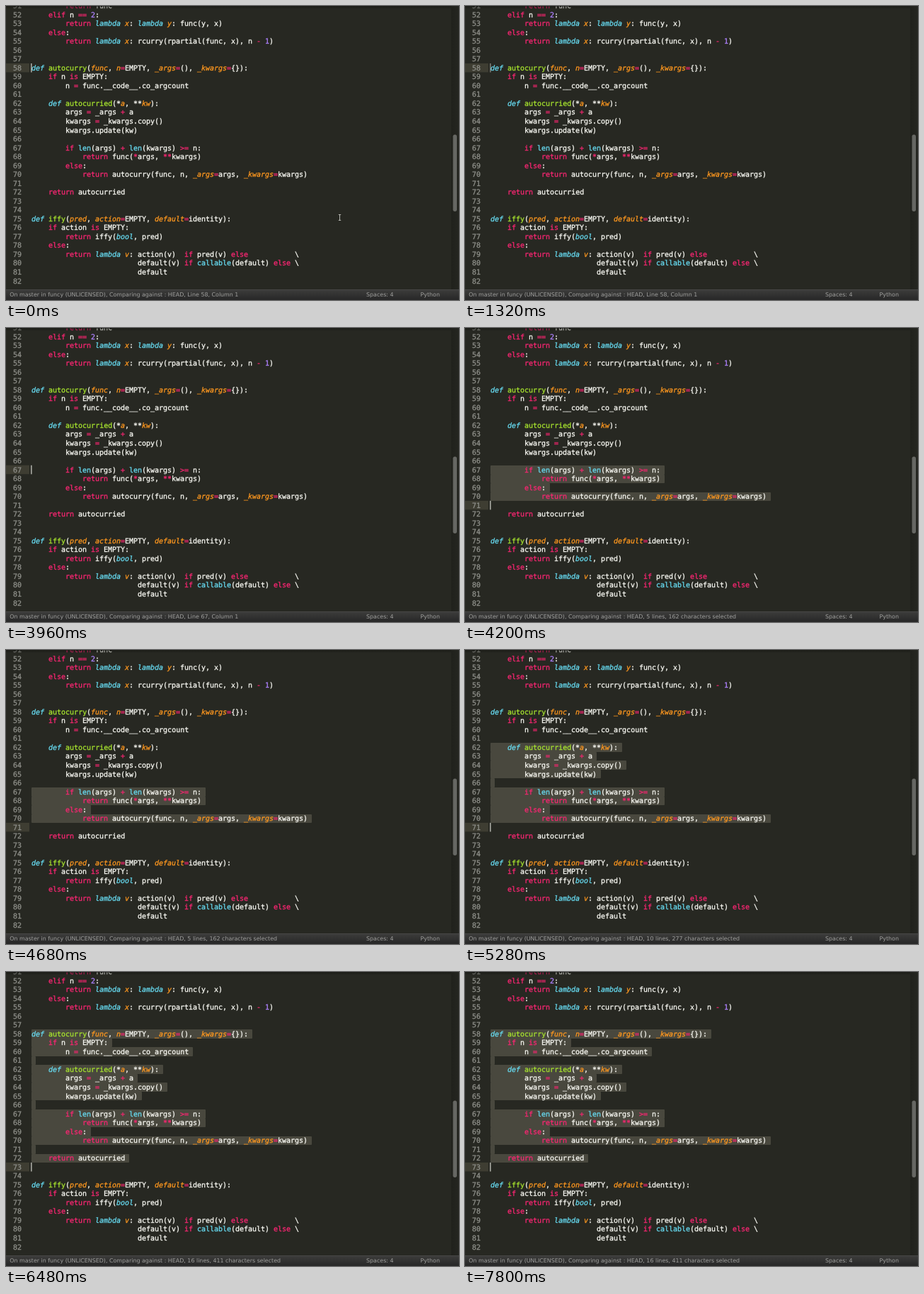
An HTML page for the animation above (8 s loop, 640 by 415 pixels).

```html
<!DOCTYPE html>
<html lang="en">
<head>
<meta charset="utf-8">
<title>Editor selection</title>
<style>
  html, body { margin: 0; width: 100%; height: 100%; overflow: hidden; background: #272822; }
  svg { display: block; width: 100%; height: 100%; }
  text { white-space: pre; text-rendering: geometricPrecision; }
  .code { font: 10px "DejaVu Sans Mono", monospace; color: #f8f8f2; }
  .code text { fill: currentColor; stroke: currentColor; stroke-width: .3px; }
  .status { font: 7.93px "DejaVu Sans", sans-serif; fill: #a0a09e; }
  .number { color: #8f908a; }
  .keyword { color: #f92672; }
  .storage { color: #66d9ef; font-style: italic; }
  .builtin { color: #66d9ef; }
  .name { color: #a6e22e; }
  .param { color: #fd971f; font-style: italic; }
  .digit { color: #ae81ff; }
</style>
</head>
<body>
<svg viewBox="0 0 640 415">
  <defs>
    <linearGradient id="bar" x2="0" y2="1">
      <stop offset="0" stop-color="#3d3d3c"/><stop offset="1" stop-color="#272727"/>
    </linearGradient>
    <linearGradient id="shade" x2="0" y2="1">
      <stop offset="0" stop-color="#151612" stop-opacity=".75"/>
      <stop offset="1" stop-color="#151612" stop-opacity="0"/>
    </linearGradient>
    <linearGradient id="track">
      <stop offset="0" stop-color="#20211c"/><stop offset="1" stop-color="#252621"/>
    </linearGradient>
  </defs>
  <rect width="640" height="415" fill="#272822"/>
  <rect id="gutter" width="33" height="12.5" fill="#3e3d32"/>
  <g id="selection" fill="#49483e"></g>
  <!-- The tiny rotation keeps fractional baselines from snapping to whole pixels. -->
  <g id="code" class="code" transform="rotate(.004)"></g>
  <rect id="caret" x="35.4" width="1" height="12.6" fill="#f8f8f0"/>
  <rect width="640" height="4" fill="url(#shade)"/>
  <rect x="629" width="11" height="401" fill="url(#track)"/>
  <rect x="631.5" y="181.5" width="5.5" height="108.5" rx="2.7" fill="#666763"/>
  <rect y="400" width="640" height="15" fill="url(#bar)"/>
  <rect y="400" width="640" height="1" fill="#464645"/>
  <g class="status">
    <text id="message" x="5.3" y="410.2"></text>
    <text x="509" y="410.2">Spaces: 4</text>
    <text x="585.5" y="410.2">Python</text>
  </g>
  <path id="mouse" d="M-1.7 -4H1.7M0 -4V4M-1.7 4H1.7" fill="none" stroke="#c4c4c0" stroke-width=".9"/>
</svg>
<script>
const LOOP = 8000, FIRST_LINE = 51, CODE_X = 36, CHAR = 6;
const $ = id => document.getElementById(id);

// A tilde marks a parameter name.
const lines = String.raw`        return func
    elif n == 2:
        return lambda ~x: lambda ~y: func(y, x)
    else:
        return lambda ~x: rcurry(rpartial(func, x), n - 1)


def autocurry(~func, ~n=EMPTY, ~_args=(), ~_kwargs={}):
    if n is EMPTY:
        n = func.__code__.co_argcount

    def autocurried(*~a, **~kw):
        args = _args + a
        kwargs = _kwargs.copy()
        kwargs.update(kw)

        if len(args) + len(kwargs) >= n:
            return func(*args, **kwargs)
        else:
            return autocurry(func, n, ~_args=args, ~_kwargs=kwargs)

    return autocurried


def iffy(~pred, ~action=EMPTY, ~default=identity):
    if action is EMPTY:
        return iffy(bool, pred)
    else:
        return lambda ~v: action(v)  if pred(v) else           \
                         default(v) if callable(default) else \
                         default
`.split("\n");

const lineTop = n => 81 + (n - 58) * 12.53;

function add(parent, tag, attrs, content = "") {
  const node = document.createElementNS("http://www.w3.org/2000/svg", tag);
  for (const key in attrs) node.setAttribute(key, attrs[key]);
  node.textContent = content;
  parent.append(node);
  return node;
}

function tokenClass(token, previous, isDef) {
  if (token[0] === "~") return "param";
  if (previous === "def") return "name";
  if (/^(return|if|elif|else|is)$/.test(token)) return "keyword";
  if (/^(def|lambda|bool)$/.test(token)) return "storage";
  if (/^(len|callable)$/.test(token)) return "builtin";
  if (/^\d+$/.test(token)) return "digit";
  if (/^[=+*<>-]+$/.test(token) && !(isDef && token[0] === "*")) return "keyword";
  return "plain";
}

const selectionRows = lines.map((line, i) => {
  const n = FIRST_LINE + i, y = lineTop(n) + 9.8;
  add($("code"), "text", { x: 10, y, class: "number" }, n);
  let marks = 0, previous = "";
  for (const { 0: token, index } of line.matchAll(/~?\w+|[=+*<>-]+|[^\s\w=+*<>~-]+/g)) {
    const x = CODE_X + (index - marks) * CHAR;
    const cls = tokenClass(token, previous, /^ *def /.test(line));
    add($("code"), "text", { x, y, class: cls }, token.replace("~", ""));
    if (token[0] === "~") marks++;
    previous = token;
  }
  const top = Math.round(lineTop(n) + .2), bottom = Math.round(lineTop(n + 1) + .2);
  const width = (line.length - marks + 1) * CHAR;
  return add($("selection"), "rect", { x: CODE_X, y: top, width, height: bottom - top, rx: 1 });
});

const states = [
  { at: 0, line: 58 },
  { at: 1920, line: 62 },
  { at: 2640, line: 67 },
  { at: 4200, line: 71, from: 67, chars: 162 },
  { at: 5280, line: 71, from: 62, chars: 277 },
  { at: 6480, line: 73, from: 58, chars: 411 },
];

// Caret opacity holds from each time until the next.
const blink = [
  [0, 1], [120, .65], [240, .3], [360, 0], [960, .6], [1080, 1],
  [1320, .65], [1440, .3], [1560, 0], [1920, 1],
  [2280, .65], [2400, .3], [2520, 0], [2640, 1],
  [3120, .4], [3240, 0], [3720, .35], [3840, .7], [3960, 1],
  [4560, .4], [4680, 0], [5280, 1],
  [5640, .65], [5760, .3], [5880, 0], [6360, .5], [6480, 1],
  [6840, .4], [6960, 0], [7560, .35], [7680, .7], [7800, 1],
];

function render(t) {
  const { line, from, chars } = states.findLast(s => s.at <= t);
  $("gutter").setAttribute("y", lineTop(line));
  $("caret").setAttribute("y", lineTop(line));
  $("caret").setAttribute("opacity", blink.findLast(b => b[0] <= t)[1]);
  selectionRows.forEach((row, i) => {
    const n = FIRST_LINE + i, selected = from && n >= from && n < line;
    row.setAttribute("visibility", selected ? "visible" : "hidden");
  });
  const detail = from
    ? `${line - from + 1} lines, ${chars} characters selected`
    : `Line ${line}, Column 1`;
  $("message").textContent = `On master in funcy (UNLICENSED), Comparing against : HEAD, ${detail}`;
  $("mouse").setAttribute("transform", t < 120 ? "translate(471.5 298.5)" : "translate(544.5 262.5)");
  $("mouse").setAttribute("visibility", t < 240 ? "visible" : "hidden");
}

const start = performance.now();
function tick() {
  render((performance.now() - start) % LOOP);
  requestAnimationFrame(tick);
}
tick();
</script>
</body>
</html>
```
